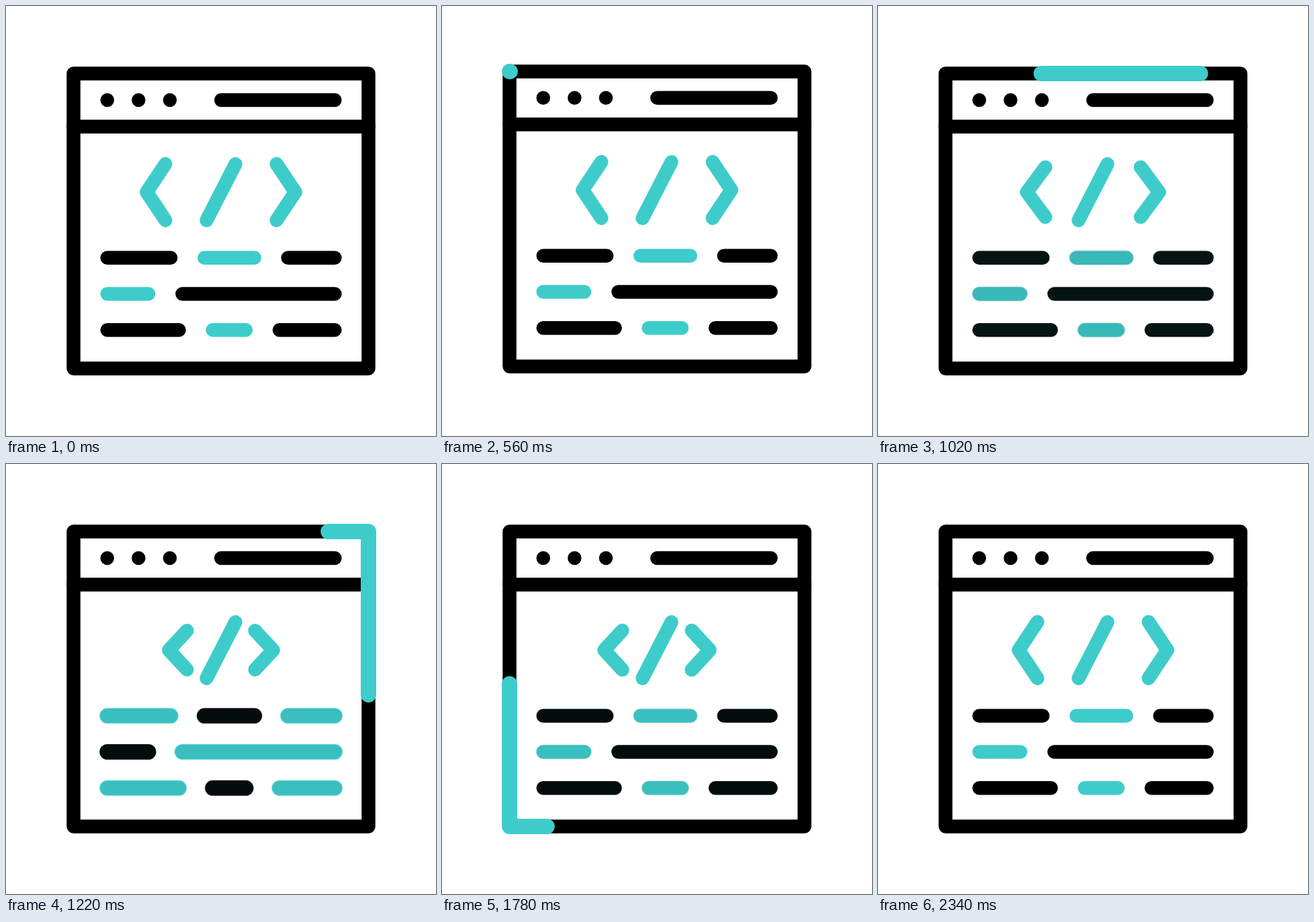
An HTML page with a canvas for the animation above (2400 ms loop, 640 by 640 pixels).

```html
<!DOCTYPE html>
<html>
<head>
<meta charset="utf-8">
<style>
  html, body { margin: 0; width: 100%; height: 100%; overflow: hidden; background: #fff; }
  canvas { display: block; }
</style>
</head>
<body>
<canvas width="640" height="640"></canvas>
<script>
const ctx = document.querySelector('canvas').getContext('2d');
const LOOP = 2400, STEP = 20;
const BLACK = '#000', TEAL = '#3ecccb';
const LEFT = 100.5, RIGHT = 539.5, SIDE = RIGHT - LEFT;
const THIN = 20.5, THICK = 23;

// Code lines: y, x start, x end, is teal
const rows = [
  [374.8, 150.7, 245.1, 0], [374.8, 295.3, 369.7, 1], [374.8, 419.7, 489.4, 0],
  [428.5, 150.7, 212, 1], [428.5, 262.4, 489.4, 0],
  [482.3, 150.7, 257.5, 0], [482.3, 307.6, 357, 1], [482.3, 407, 489.4, 0]
];

const ease = (t, start, length) => {
  const u = Math.min(1, Math.max(0, (t - start) / length));
  return u * u * (3 - 2 * u);
};

// Two there-and-back swings, each half lasting `half` ms
const swing = (t, start, half) => {
  const u = (t - start) / half;
  if (u <= 0 || u >= 4) return 0;
  const v = u % 2;
  return ease(v < 1 ? v : 2 - v, 0, 1);
};

function line(color, width, ...points) {
  ctx.strokeStyle = color;
  ctx.lineWidth = width;
  ctx.beginPath();
  points.forEach(([x, y]) => ctx.lineTo(x, y));
  ctx.stroke();
}

function drawWindow() {
  line(BLACK, THIN, [LEFT, 179.4], [RIGHT, 179.4]);
  ctx.lineWidth = THIN;
  ctx.strokeRect(LEFT, LEFT, SIDE, SIDE);
  for (const x of [150.7, 197.3, 243.9]) line(BLACK, THIN, [x, 139.9], [x + .01, 139.9]);
  line(BLACK, THIN, [320.2, 139.9], [489.4, 139.9]);
}

function drawRows(width, swapped) {
  for (const [y, x1, x2, teal] of rows)
    line(teal ^ swapped ? TEAL : BLACK, width, [x1, y], [x2, y]);
}

function drawTag(squeeze) {
  const tip = 110.6 - 34.5 * squeeze;
  const end = 82.7 - 33.5 * squeeze;
  const rise = 41.9 - 13.6 * squeeze;
  for (const side of [-1, 1]) {
    const x = 320 + side * end;
    line(TEAL, THIN, [x, 277 - rise], [320 + side * tip, 277], [x, 277 + rise]);
  }
  line(TEAL, THIN, [341.5, 235.3], [298.5, 318.9]);
}

function drawRunner(t) {
  if (t <= 540 || t >= 2340) return;
  const total = SIDE * 4;
  const head = total * ease(t, 540, 1600);
  const tail = total * ease(t, 740, 1600);
  ctx.setLineDash([head - tail, total * 2]);
  ctx.lineDashOffset = -tail;
  line(TEAL, THICK, [LEFT, LEFT], [RIGHT, LEFT], [RIGHT, RIGHT], [LEFT, RIGHT], [LEFT, LEFT]);
  ctx.setLineDash([]);
}

function draw(t) {
  ctx.fillStyle = '#fff';
  ctx.fillRect(0, 0, 640, 640);
  ctx.save();
  ctx.lineCap = ctx.lineJoin = 'round';
  ctx.translate(0, -30 * swing(t, 200, 200));
  drawWindow();
  drawTag(swing(t, 910, 275));
  drawRows(THIN, 0);
  ctx.globalAlpha = swing(t, 981, 207.5);
  drawRows(THICK, 1);
  ctx.globalAlpha = 1;
  drawRunner(t);
  ctx.restore();
}

const begin = performance.now();
function tick() {
  const t = (performance.now() - begin) % LOOP;
  draw(Math.floor(t / STEP) * STEP);
  requestAnimationFrame(tick);
}
tick();
</script>
</body>
</html>
```
